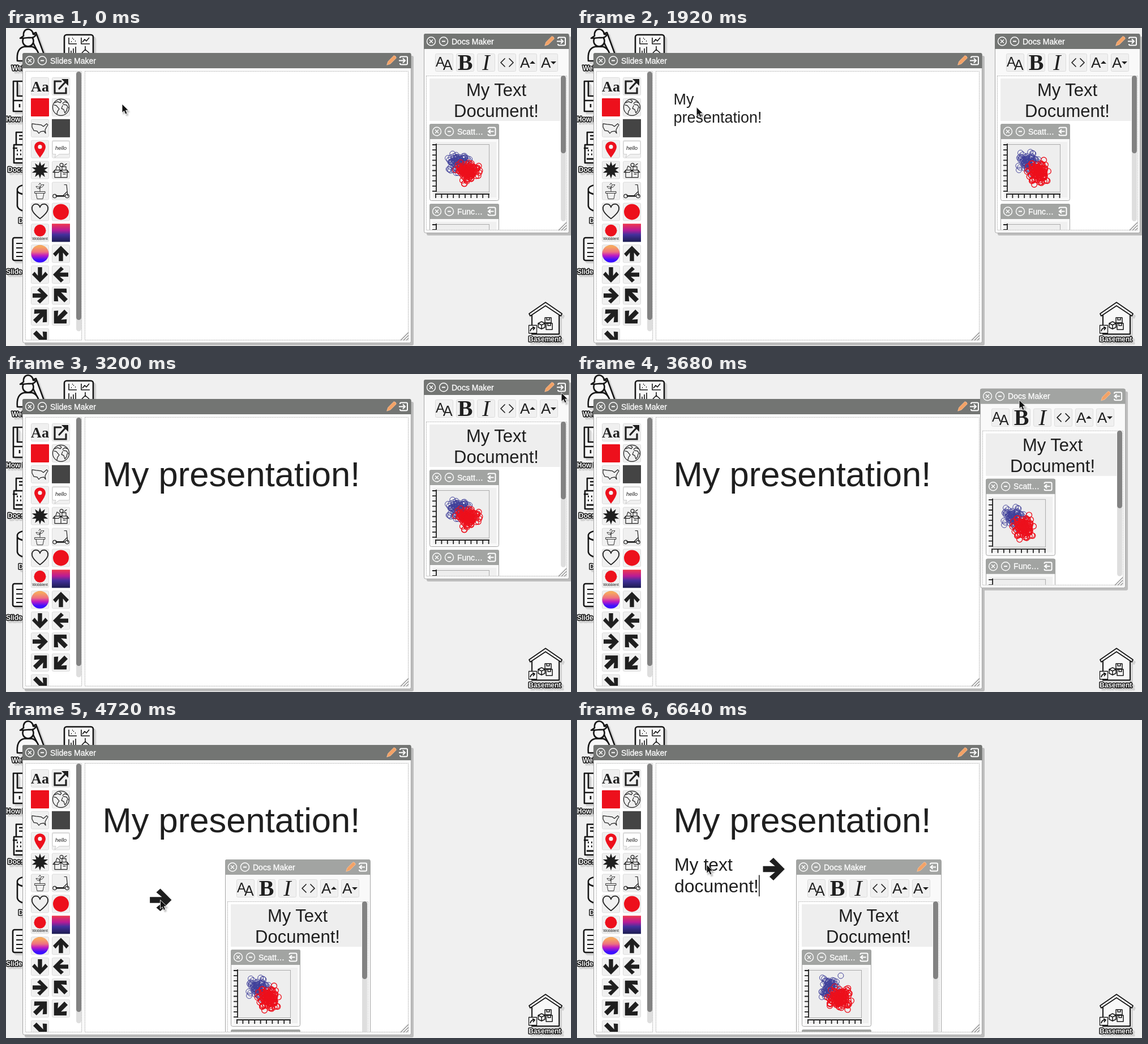
These frames come from a looping animation (998 px wide and 561 px high, 6720 ms). An HTML page:

```html
<!DOCTYPE html>
<html lang="en">
<head>
<meta charset="utf-8">
<title>Slides desktop</title>
<style>
html, body { margin: 0; width: 100%; height: 100%; overflow: hidden; background: #f0f0f0; }
svg { display: block; width: 998px; height: 561px; font-family: "Liberation Sans", Arial, sans-serif; }
text { white-space: pre; }
.desk { fill: #f8f8f8; stroke: #161616; stroke-width: 2.6; stroke-linejoin: round; filter: drop-shadow(4px 4px 0 #d2d2d2); }
.desk text { font-size: 12px; font-weight: bold; fill: #fff; stroke: #111; stroke-width: 3; paint-order: stroke; }
.line { fill: none; stroke: #222; stroke-width: 1.2; stroke-linejoin: round; stroke-linecap: round; }
.dots { stroke: #bcbcbc; stroke-dasharray: 2 1; }
.head { fill: none; stroke: #fff; stroke-width: 1.4; }
.heavy { stroke-width: 2; }
.cursor { filter: drop-shadow(2px 3px 1px #0004); }
</style>
</head>
<body>
<svg id="stage" viewBox="0 0 998 561"></svg>
<script>
const LOOP = 6720, STEP = 80;
const INK = '#1f1f1f', RED = '#ed101c', DARK = '#737573', PALE = '#a2a4a2';
const stage = document.getElementById('stage');

// ---- drawing helpers ----
const put = (x, y, body) => `<g transform="translate(${x} ${y})">${body}</g>`;
const rect = (x, y, w, h, fill, more = '') =>
  `<rect x="${x}" y="${y}" width="${w}" height="${h}" fill="${fill}" ${more}/>`;
const path = (d, more = '') => `<path d="${d}" ${more}/>`;
const line = (d, more = '') => path(d, `class="line" ${more}`);
const disc = (x, y, r, fill, more = '') => `<circle cx="${x}" cy="${y}" r="${r}" fill="${fill}" ${more}/>`;
const text = (x, y, size, str, more = '') =>
  `<text x="${x}" y="${y}" font-size="${size}" fill="${INK}" ${more}>${str}</text>`;
const mid = 'text-anchor="middle"';
const serif = 'font-family="Liberation Serif, Times, serif"';

const hatch = (x, y, n = 14, color = '#999') => {
  let d = '';
  for (let k = n; k > 2; k -= 5) d += `M${x - k},${y}L${x},${y - k}`;
  return path(d, `stroke="${color}" stroke-width="1.6" fill="none"`);
};

const scroller = (x, y, thumb, track) =>
  rect(x, y, 9, track, '#dedede', 'rx="4.5"') + rect(x, y, 9, thumb, '#828282', 'rx="4.5"');

const pencil = path('M-3,-9.5Q0,-12 3,-9.5V5L0,11L-3,5Z',
  'transform="rotate(45)" fill="#f3a266" stroke="#ffc9a0" stroke-width=".7"');

const door = out => path('M-6,-4.5V-5Q-6,-7 -4,-7H5Q7,-7 7,-5V5Q7,7 5,7H-4Q-6,7 -6,5V4.5', 'class="head heavy"') +
  path(out ? 'M4,0H-6M-1.5,-3.5L-5.5,0L-1.5,3.5' : 'M-8,0H3M-1,-4L3,0L-1,4', 'class="head heavy"');

function header(x, y, w, title, color, out, pen) {
  const cy = y + 13.5;
  return path(`M${x},${y + 27}V${y + 3}Q${x},${y} ${x + 3},${y}H${x + w - 3}Q${x + w},${y} ${x + w},${y + 3}V${y + 27}Z`,
    `fill="${color}"`) +
    put(x + 13, cy, disc(0, 0, 7.5, 'none', 'class="head"') + path('M-3,-3L3,3M3,-3L-3,3', 'class="head"')) +
    put(x + 35, cy, disc(0, 0, 7.5, 'none', 'class="head"') + path('M-3,0H3', 'class="head heavy"')) +
    `<text x="${x + 49}" y="${cy + 5}" font-size="14" fill="#fff" stroke="#fff" stroke-width=".3">${title}</text>` +
    (pen ? put(x + w - 35, cy, pencil) : '') + put(x + w - 13.5, cy, door(out));
}

const frame = (x, y, w, h) =>
  rect(x, y, w, h, '#f9f9f9', 'rx="3" stroke="#a6a6a6"');

const cell = (x, y, body) =>
  put(x, y, rect(0.5, 0.5, 31, 31, '#f0f0f0', 'rx="2" stroke="#dcdcdc"') + body);

// ---- tool icons, each in a 32 px cell ----
const arrowShape = 'M-13,-3.7H2L-5,-9.5L0,-14L14,0L0,14L-5,9.5L2,3.7H-13Z';
const arrow = deg => {
  const slant = deg % 90 ? 'scale(1.12) translate(1.5 0)' : '';
  return path(arrowShape, `fill="${INK}" transform="translate(16 16) rotate(${deg}) ${slant}"`);
};

function burst() {
  let d = '';
  for (let i = 0; i < 20; i++) {
    const r = i % 2 ? 8 : 15, a = i * Math.PI / 10 - Math.PI / 2;
    d += `${i ? 'L' : 'M'}${(16 + r * Math.cos(a)).toFixed(1)},${(16 + r * Math.sin(a)).toFixed(1)}`;
  }
  return path(d + 'Z', `fill="${INK}"`);
}

const tools = [
  text(16, 25, 26, 'Aa', mid + ' font-weight="bold" ' + serif),
  line('M16,7H5V28H25V19M13,20L26,6', 'style="stroke-width:3.2;stroke-linejoin:miter"') + path('M17,3H29V15Z', `fill="${INK}"`),
  rect(0, 0, 32, 32, RED, 'rx="1"'),
  disc(16, 16, 14.5, 'none', 'class="line"') +
    line('M5,8L10,6L15,8L17,5L14,3M4,12L8,13L13,19L10,23L9,28M19,9L23,6L27,8M20,11L26,12L29,17M19,13L17,18L21,20L23,26L26,22L27,17'),
  line('M2,8L9,9L18,10L22,13L28,8L30,10L27,15L25,19L26,25L23,21L17,22L14,25L11,21L5,20L2,14Z'),
  rect(0, 0, 32, 32, '#444'),
  path('M16,31Q6,18 6,12A10,9.5 0 0 1 26,12Q26,18 16,31Z', `fill="${RED}"`) + disc(16, 12, 3.6, '#f4f4f4'),
  path('M3,2H29Q31,2 31,4V23Q31,25 29,25H13L5,31L7,25H3Q1,25 1,23V4Q1,2 3,2Z', 'fill="#fff" stroke="#ccc"') +
    text(16, 17, 9.5, 'hello', mid + ' font-style="italic"'),
  burst(),
  line('M5,16H27V29H5ZM5,16L2,20H12L16,16L20,20H30L27,16M16,16V29M7,15L9,9L14,12V15M18,15V10H25V15M14,7A3,3 0 1 1 20,7A3,3 0 1 1 14,7M20,23H24M22,8L26,5'),
  line('M7,17H25V20H7ZM9,20L11,30H21L23,20M16,17V7M16,12Q10,12 9,8Q14,7 16,12M16,10Q21,10 23,5Q17,4 16,10M14,5L16,2L18,5', 'style="stroke-width:.9"'),
  line('M22,5H26L28,25M7,24H20L27,17') + disc(5, 25, 3.2, 'none', 'class="line"') + disc(27, 25, 3.2, 'none', 'class="line"') +
    line('M8,25H22', 'style="stroke-width:2.5"'),
  line('M16,28Q2,17 2,10.5A7,7 0 0 1 16,8A7,7 0 0 1 30,10.5Q30,17 16,28Z', 'style="stroke-width:1.8"'),
  disc(16, 16, 14, RED),
  disc(16, 12, 10.5, RED) + text(16, 29, 6.6, 'Wobblent', mid),
  rect(0, 0, 32, 32, 'url(#dusk)'),
  disc(16, 16, 15.5, 'url(#sun)'),
  ...[-90, 90, 180, 0, -135, -45, 135, 45].map(arrow)
];

const docTools = [
  text(1, 23, 24, 'A') + text(14, 29, 25, 'A'),
  text(16, 29, 40, 'B', mid + ' font-weight="bold" ' + serif),
  text(16, 29, 40, 'I', mid + ' font-style="italic" ' + serif),
  line('M12,9L5,16L12,23M20,9L27,16L20,23', 'style="stroke-width:1.7"'),
  text(2, 25, 26, 'A') + path('M19,18L24,13L29,18Z', `fill="${INK}"`),
  text(2, 25, 26, 'A') + path('M19,14L24,19L29,14Z', `fill="${INK}"`)
];

// ---- scene parts ----
const defs = `<defs>
  <linearGradient id="dusk" x2="0" y2="1"><stop stop-color="#f0384c"/><stop offset=".35" stop-color="#b81c96"/><stop offset=".6" stop-color="#44309c"/><stop offset="1" stop-color="#1c1c50"/></linearGradient>
  <linearGradient id="sun" x2="0" y2="1"><stop offset=".1" stop-color="#f6a860"/><stop offset=".4" stop-color="#ee7080"/><stop offset=".6" stop-color="#c01cc0"/><stop offset=".85" stop-color="#3c10ff"/></linearGradient>
  <clipPath id="slide"><rect x="140" y="77" width="570" height="473"/></clipPath>
  <clipPath id="palette"><rect x="34" y="77" width="90" height="473"/></clipPath>
  <clipPath id="page"><rect x="742" y="84" width="248" height="272"/></clipPath>
</defs>`;

const desktop = `<g class="desk">
  <path d="M48,10L53,8L67,46H58L47,24Z"/>
  <path d="M20,58Q18,36 32,33H46Q58,36 60,58Z"/>
  <circle cx="39" cy="23" r="9.5"/><path d="M25,18L31,14Q30,3 39,2Q47,3 48,11L53,12Q50,18 40,17Q32,18 25,18Z"/>
  <rect x="103" y="12" width="51" height="46" rx="4"/>
  <path d="M111,17V28H125M133,17V28H148M135,25L139,20L142,23L147,17M111,34V46M115,40V46M119,36V46M123,33V46M140,32V38L134,44M140,38L147,44" fill="none" stroke-width="1.6"/>
  <path d="M115,24h1M119,20h1M122,23h1M117,18h1" stroke-width="2"/>
  <path d="M13,94H60V147H13ZM20,94V120H40M13,128H40M24,134V140"/>
  <path d="M18,184H44V206H18ZM14,206H50V238H14ZM12,212H20M23,190H40M23,196H40"/>
  <path d="M19,216h2M25,216h2M19,223h2M25,223h2M17,231H40" stroke-width="3"/>
  <path d="M20,284Q22,276 45,276V324Q22,324 20,314ZM20,288Q24,294 40,294"/>
  <rect x="12" y="370" width="48" height="40" rx="3"/><path d="M18,380H50M18,388H50M18,396H50M18,403H50" stroke-width="1.8"/>
  <text x="10" y="75">Welcome</text><text x="0" y="165">How it works</text><text x="3" y="254">Docs Maker</text>
  <text x="22" y="344">Data</text><text x="0" y="434">Slides Maker</text>
  <path d="M929,503V540H977V503L953,486Z" stroke-width="2"/>
  <path d="M924,504L953,484L982,504L980,508L953,490L926,508Z" stroke-width="1.8"/>
  <path d="M940,521L946,518L952,521V528L946,531L940,528ZM940,521L946,524L952,521M946,524V531M952,511H963V520H952ZM955,511V515H960V511M954,521H965V532H954ZM957,521V525H962V521" stroke-width="1.5"/>
  <rect x="923.5" y="524.5" width="14" height="14" stroke-width="1.3"/>
  <path d="M926,535Q927,529 933,529M930,527L934,529L931,533" fill="none" stroke-width="1.8"/>
  <text x="923" y="553">Basement</text>
</g>`;

const slides = rect(33, 49, 687, 511, '#bdbdbd', 'rx="3"') + frame(29.5, 44.5, 686, 511) +
  header(29, 44, 686.5, 'Slides Maker', DARK, false, true) +
  rect(34.5, 76.5, 99, 474, '#fff', 'class="dots"') +
  `<g clip-path="url(#palette)">${tools.map((icon, i) =>
    cell(44 + 37 * (i % 2), 87 + 36.9 * (i >> 1), icon)).join('')}</g>` +
  scroller(124, 77, 438, 458) +
  rect(139.5, 76.5, 571, 474, '#fff', 'class="dots"') + hatch(711, 551);

function axes() {
  let d = 'M760,204V289M758,293H854';
  for (let i = 0; i < 10; i++) d += `M753,${206 + i * 9.1}H760M${759 + i * 10.4},293V300`;
  return path(d, 'stroke="#222" stroke-width="1.8" fill="none"');
}

const docsBody = frame(738.5, 10.5, 256, 351) + '<g id="docHead"></g>' +
  docTools.map((icon, i) => cell(758 + 37 * i, 45, icon)).join('') +
  rect(742.5, 84.5, 248, 272, '#fff', 'class="dots"') +
  rect(748, 89, 231, 75, '#eee') +
  text(866, 120, 31, 'My Text', mid) + text(866, 157, 31, 'Document!', mid) +
  '<g clip-path="url(#page)">' +
  frame(748.5, 169.5, 122, 135) + header(748, 169, 123, 'Scatt…', PALE, true) +
  rect(754, 201, 112, 98, '#f0f0f0') + rect(760.5, 205.5, 93, 84, '#eee', 'stroke="#aaa"') + axes() + '<g id="cloud"></g>' +
  frame(748.5, 310.5, 122, 135) + header(748, 310, 123, 'Func…', PALE, true) +
  rect(754, 342, 112, 98, '#f0f0f0') + rect(760.5, 346.5, 93, 84, '#eee', 'stroke="#aaa"') +
  path('M760,345V440M753,347H760M753,356H760', 'stroke="#222" stroke-width="1.8"') +
  '</g>' + scroller(980, 84, 137, 257) + hatch(990, 357);

const handles = '<g fill="none" stroke="#aaa" stroke-width="1.3">' +
  path('M6,111H18M12,105V117M8,109L6,111L8,113M16,109L18,111L16,113M10,107L12,105L14,107M10,115L12,117L14,115M12,107L16,111L12,115L8,111Z', 'id="grip"') +
  path('M-13,0H-1M-10,-3L-13,0L-10,3M-4,-3L-1,0L-4,3', 'id="wide"') +
  path('M0,-13V-1M-3,-4L0,-1L3,-4', 'id="tall"') +
  `<g id="corner">${hatch(0, 0, 13)}</g></g>`;

const label = id => `<g id="${id}" fill="${INK}"><text/><text/><rect width="1.6"/></g>`;

stage.innerHTML = defs + desktop + slides + label('title') +
  `<g id="handles">${handles}</g>` + `<g id="pointer">${path(arrowShape, `fill="${INK}" transform="scale(1.42)"`)}</g>` +
  `<g id="docsClip"><g id="docs">${rect(743, 15, 256, 351, '#bdbdbd', 'id="docShade" rx="3"')}${docsBody}</g></g>` +
  label('note') +
  `<g id="cursor" class="cursor">${path('M0,0V15.5L3.6,12.3L6,18L9,16.8L6.6,11.2H11.4Z', 'fill="#111" stroke="#fff" stroke-width=".9"')}</g>`;

const $ = id => document.getElementById(id);
const move = (id, x, y) => $(id).setAttribute('transform', `translate(${x} ${y})`);
const show = (id, on) => $(id).style.display = on ? '' : 'none';

// ---- text that fits its box on one or two lines ----
const pen = document.createElement('canvas').getContext('2d');
pen.font = '100px "Liberation Sans", Arial, sans-serif';
const em = s => pen.measureText(s).width / 100;

function fit(str, w, h) {
  const one = Math.min((w - 8) / em(str), h * .85);
  let best = { size: one, rows: [str] }, top = one * 1.05;
  for (let i = str.indexOf(' '); i > 0; i = str.indexOf(' ', i + 1)) {
    const rows = [str.slice(0, i), str.slice(i + 1)];
    if (!rows[1]) continue;
    const size = Math.min((w - 2) / Math.max(...rows.map(em)), h * .42);
    // on a tie the later break wins, so the first line is filled
    if (size >= top) { best = { size, rows }; top = size; }
  }
  return best;
}

function setLabel(id, str, x, y, w, h, caret) {
  const { size, rows } = fit(str || ' ', w, h);
  const [a, b, bar] = $(id).children;
  const lead = size * 1.18;
  const rowMid = i => y + h / 2 + (i - (rows.length - 1) / 2) * lead;
  [a, b].forEach((node, i) => {
    node.textContent = rows[i] || '';
    node.setAttribute('x', x);
    node.setAttribute('y', rowMid(i) + size * .36);
    node.setAttribute('font-size', size);
  });
  const last = rows.length - 1;
  bar.setAttribute('x', x + em(rows[last]) * size);
  bar.setAttribute('y', rowMid(last) - lead / 2);
  bar.setAttribute('height', lead);
  bar.style.display = caret ? '' : 'none';
}

// ---- scatter cloud ----
function cloud(seed) {
  let s = seed * 7919 + 17;
  const rnd = () => (s = (s * 16807) % 2147483647) / 2147483647;
  const bell = () => (rnd() + rnd() + rnd() + rnd() - 2) * 14.5;
  const blob = (n, x, y, color, w) => Array.from({ length: n }, () =>
    disc((x + bell()).toFixed(1), (y + bell()).toFixed(1), 5, 'none', `stroke="${color}" stroke-width="${w}"`)).join('');
  return blob(85, 798, 237, '#40409a', 1) + blob(120, 816, 255, RED, 1.3);
}

// ---- motion ----
const route = [
  [0, 205, 134], [240, 61, 104], [320, 61, 104], [560, 249, 141], [680, 209, 139], [1900, 209, 139],
  [2240, 420, 190], [2560, 375, 166], [2640, 326, 175], [2960, 631, 244], [3200, 981, 33],
  [3280, 982, 24], [3360, 982, 24], [3600, 807, 30], [4080, 457, 243], [4160, 456, 266],
  [4480, 60, 473], [4560, 60, 473], [4800, 347, 263], [5040, 60, 103], [5120, 60, 103],
  [5440, 253, 272], [5600, 229, 255], [LOOP, 229, 255]
];
const clouds = [[0, 1], [480, 2], [2880, 1], [3600, 2], [5920, 3]];

function mouse(t) {
  const i = route.findIndex(k => k[0] > t);
  const [t0, x0, y0] = route[i - 1], [t1, x1, y1] = route[i];
  const u = (t - t0) / (t1 - t0), e = u * u * (3 - 2 * u);
  return [x0 + (x1 - x0) * e, y0 + (y1 - y0) * e];
}

const typed = (str, t, start, pace) =>
  t < start ? 'insert text here' : str.slice(0, Math.max(1, Math.floor((t - start) / pace)));

let seedNow, headNow;

function draw(t) {
  const [cx, cy] = mouse(t);
  move('cursor', cx, cy);

  let x = 170.5, y = 103, w = 158, h = 76;
  if (t < 560) { x = cx - 79; y = cy - 38; }
  if (t >= 2640) {
    const [mx, my] = mouse(Math.min(t, 2960));
    w += mx - 326;
    h += my - 175;
  }
  show('title', t >= 320);
  setLabel('title', typed('My presentation!', t, 660, 57.5), x, y, w, h, t >= 660 && t < 1760);

  show('handles', t >= 2000 && t < 3040);
  move('grip', x, y - 103);
  move('wide', x + w, y + h / 2);
  move('tall', x + w / 2 + 4, y + h - 2);
  move('corner', x + w, y + h - 2);

  const loose = t >= 3360, dropped = t >= 4160;
  const [dx, dy] = dropped ? [-351, 236] : t >= 3600 ? [cx - 807, cy - 30] : [0, 0];
  move('docs', dx, dy);
  $('docsClip').setAttribute('clip-path', dropped ? 'url(#slide)' : 'none');
  show('docShade', !dropped);
  if (loose !== headNow) {
    headNow = loose;
    $('docHead').innerHTML = header(738, 10, 256.5, 'Docs Maker', loose ? PALE : DARK, loose, true);
  }

  show('pointer', t >= 4560);
  if (t < 4800) move('pointer', cx, cy); else move('pointer', 347, 263);

  show('note', t >= 5120);
  const held = t < 5440;
  setLabel('note', typed('My text document!', t, 5600, 57),
    held ? cx - 81 : 172, held ? cy - 36.5 : 235.5, 158, 76, t >= 5600);

  const seed = clouds.filter(k => k[0] <= t).pop()[1];
  if (seed !== seedNow) $('cloud').innerHTML = cloud(seedNow = seed);
}

function tick() {
  draw(Math.floor(performance.now() % LOOP / STEP) * STEP);
  requestAnimationFrame(tick);
}
tick();
</script>
</body>
</html>
```
